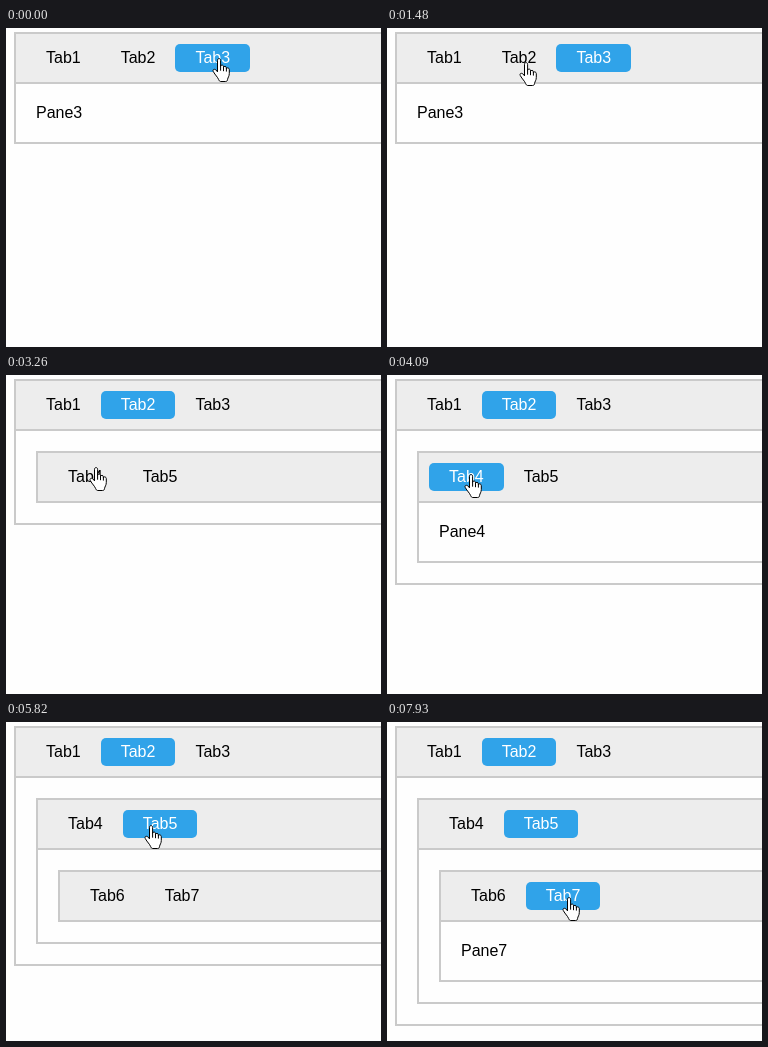
Animation of 375x319 px, one loop 8000 ms. Source, as an HTML page:

```html
<!DOCTYPE html>
<html lang="en">
<head>
<meta charset="utf-8">
<title>Nested tabs</title>
<style>
html, body { margin: 0; width: 100%; height: 100%; overflow: hidden; background: #fefefe; }
body { position: relative; font: 16px/18px "Liberation Sans", Arial, sans-serif; color: #000; }

.panel, .pane, .cursor, .cursor svg { position: absolute; }
.panel { box-sizing: border-box; left: 20px; top: 70px; width: 600px; border: 2px solid #cacaca; }
.outer { left: 8px; top: 4px; }
.bar { display: flex; height: 28px; padding: 10px; background: #ededed; border-bottom: 2px solid #cacaca; }
.tab { padding: 5px 20px; border-radius: 5px; }
.pane { left: 20px; top: 70px; }

.panel, .pane, .tab, .cursor, .cursor svg { animation: 8s step-end infinite; }

/* Panels grow as their content changes */
.outer { height: 112px; animation-name: outer; }
.middle { height: 52px; visibility: hidden; animation-name: middle; }
.inner { height: 52px; visibility: hidden; animation-name: inner; }
@keyframes outer {
  0% { height: 112px; }
  21.875% { height: 146px; }
  51.125% { height: 206px; }
  72.75% { height: 240px; }
  99.125% { height: 300px; }
}
@keyframes middle {
  0% { height: 52px; visibility: hidden; }
  21.875% { height: 52px; visibility: visible; }
  51.125% { height: 112px; visibility: visible; }
  72.75% { height: 146px; visibility: visible; }
  99.125% { height: 206px; visibility: visible; }
}
@keyframes inner {
  0% { height: 52px; visibility: hidden; }
  72.75% { height: 52px; visibility: visible; }
  99.125% { height: 112px; visibility: visible; }
}

.pane3 { animation-name: pane3; }
.pane4 { visibility: hidden; animation-name: pane4; }
.pane7 { visibility: hidden; animation-name: pane7; }
@keyframes pane3 { 0% { visibility: visible; } 21.875% { visibility: hidden; } }
@keyframes pane4 { 0%, 72.75% { visibility: hidden; } 51.125% { visibility: visible; } }
@keyframes pane7 { 0% { visibility: hidden; } 99.125% { visibility: visible; } }

/* Selected tabs */
.tab2 { animation-name: tab2; }
.tab3 { animation-name: tab3; }
.tab4 { animation-name: tab4; }
.tab5 { animation-name: tab5; }
.tab7 { animation-name: tab7; }
@keyframes tab2 { 21.875% { background: #30a3e9; color: #fff; } }
@keyframes tab3 { 0% { background: #30a3e9; color: #fff; } 21.875% { background: none; color: #000; } }
@keyframes tab4 { 51.125% { background: #30a3e9; color: #fff; } 72.75% { background: none; color: #000; } }
@keyframes tab5 { 72.75% { background: #30a3e9; color: #fff; } }
@keyframes tab7 { 99.125% { background: #30a3e9; color: #fff; } }

/* Pointer */
.cursor { left: 0; top: 0; animation-name: move; }
.cursor svg { left: 0; top: 0; overflow: visible; fill: #fff; stroke: #000; stroke-linejoin: round; stroke-linecap: round; }
.hand { animation-name: hand; }
.arrow { visibility: hidden; animation-name: arrow; }
@keyframes hand {
  0%, 40.75%, 84.75% { visibility: visible; }
  33.5%, 82.875% { visibility: hidden; }
}
@keyframes arrow {
  0%, 40.75%, 84.75% { visibility: hidden; }
  33.5%, 82.875% { visibility: visible; }
}
@keyframes move {
  0% { transform: translate(206px, 30px); }
  9.375% { transform: translate(186px, 32px); }
  11.25% { transform: translate(161px, 33px); }
  12.75% { transform: translate(143px, 34px); }
  14.625% { transform: translate(136px, 34px); }
  16.625% { transform: translate(133px, 34px); }
  18.5% { transform: translate(132px, 34px); }
  32% { transform: translate(130px, 38px); }
  33.5% { transform: translate(125px, 52px); }
  35.375% { transform: translate(117px, 61px); }
  37.25% { transform: translate(106px, 71px); }
  38.875% { transform: translate(95px, 82px); }
  40.75% { transform: translate(83px, 92px); }
  42.25% { transform: translate(78px, 98px); }
  44.125% { transform: translate(77px, 99px); }
  62% { transform: translate(92px, 100px); }
  63.5% { transform: translate(114px, 102px); }
  65.5% { transform: translate(132px, 103px); }
  67.375% { transform: translate(138px, 103px); }
  81% { transform: translate(139px, 109px); }
  82.875% { transform: translate(157px, 142px); }
  84.75% { transform: translate(172px, 173px); }
  86.625% { transform: translate(175px, 175px); }
}
</style>
</head>
<body>
<div class="panel outer">
  <div class="bar"><div class="tab">Tab1</div><div class="tab tab2">Tab2</div><div class="tab tab3">Tab3</div></div>
  <div class="pane pane3">Pane3</div>
  <div class="panel middle">
    <div class="bar"><div class="tab tab4">Tab4</div><div class="tab tab5">Tab5</div></div>
    <div class="pane pane4">Pane4</div>
    <div class="panel inner">
      <div class="bar"><div class="tab">Tab6</div><div class="tab tab7">Tab7</div></div>
      <div class="pane pane7">Pane7</div>
    </div>
  </div>
</div>
<div class="cursor">
  <svg class="hand" width="18" height="24">
    <path d="M5.5 13.5V2.3C5.5 0 8.6 0 8.6 2.3V8.2C8.8 6.6 11.5 6.7 11.5 8.6V9.4C11.8 7.9 14.4 8 14.4 9.9V10.6C14.7 9.4 17.3 9.6 17.3 11.6V15.5C17.3 18.3 15.8 19.6 15.6 21.3C15.5 23 14.6 23.5 13.5 23.5H8.7C7.6 23.5 7.1 22.6 6.6 21.5C5.6 19 3.4 17.3 1.3 13.6C.2 11.6 2.4 10.5 3.8 11.8Z"/>
    <path fill="none" d="M8.6 8V12.3M11.5 9V12.8M14.4 10.3V13.2"/>
  </svg>
  <svg class="arrow" width="12" height="19">
    <path d="M.5 .7V16.6L4.1 13.2L6.5 18.4L8.9 17.4L6.6 12.2H11.5Z"/>
  </svg>
</div>
</body>
</html>
```
